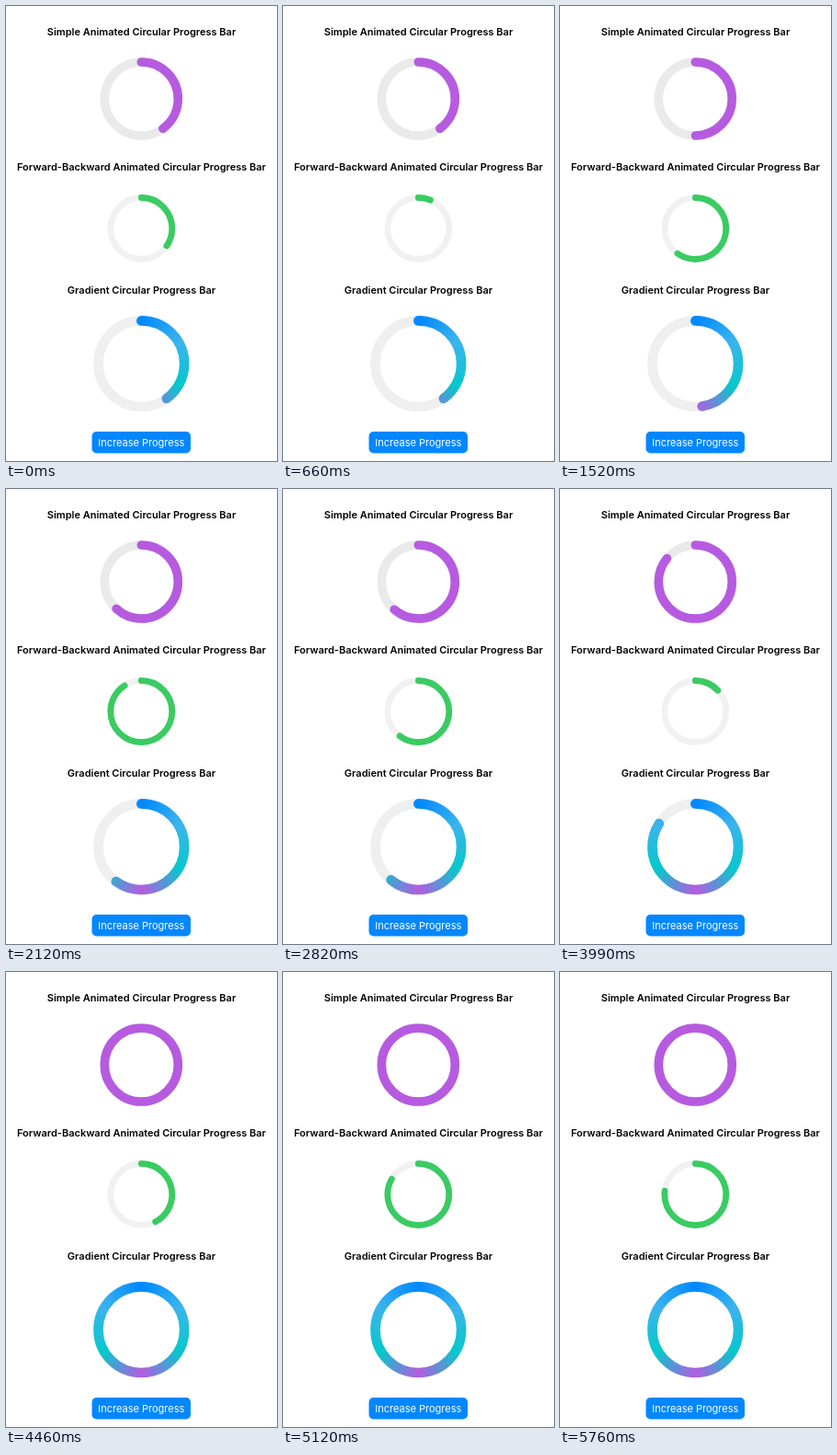
An HTML page with a canvas that plays this animation: 295x495 px, repeating every 5860 ms.

```html
<!DOCTYPE html>
<html lang="en">
<head>
<meta charset="utf-8">
<title>Circular progress bars</title>
<style>
  html, body { margin: 0; width: 100%; height: 100%; overflow: hidden; background: #fff; }
  canvas, svg { position: absolute; left: 0; top: 0; width: 295px; height: 495px; }
  text { font: 600 11px Inter, "Liberation Sans", sans-serif; text-anchor: middle; }
  .label { font-weight: 400; fill: #fff; }
</style>
</head>
<body>
<canvas></canvas>
<svg viewBox="0 0 295 495">
  <text x="147.5" y="31.5">Simple Animated Circular Progress Bar</text>
  <text x="147.5" y="179">Forward-Backward Animated Circular Progress Bar</text>
  <text x="147.5" y="313">Gradient Circular Progress Bar</text>
  <rect x="93.5" y="463" width="107.5" height="23.5" rx="5" fill="#0387ff"/>
  <text class="label" x="147.3" y="479">Increase Progress</text>
</svg>
<script>
const LOOP = 5860, SWEEP = 1610, LOW = 557, START = 0.4, STEP = 0.2;
const TAPS = [1250, 2720, 3800];
// Runs of evenly spaced picture changes: first, last, count
const RUNS = [
  [120, 660, 6], [760, 1320, 6], [1420, 1920, 6], [2020, 2450, 5], [2590, 3130, 6],
  [3230, 3760, 6], [3870, 4340, 5], [4460, 5020, 6], [5120, 5320, 3], [5460, 5760, 4]
];
const TICKS = [0, ...RUNS.flatMap(([a, b, n]) =>
  Array.from({ length: n }, (_, i) => a + (b - a) * i / (n - 1)))];

const canvas = document.querySelector('canvas');
const ctx = canvas.getContext('2d');
const ratio = window.devicePixelRatio || 1;
canvas.width = 295 * ratio;
canvas.height = 495 * ratio;
ctx.scale(ratio, ratio);
ctx.lineCap = 'round';

const rainbow = ctx.createConicGradient(-Math.PI / 2, 147.3, 389.2);
['#0088ff', '#3bb4ec', '#06c8cc', '#b45ce0', '#06c8cc', '#3bb4ec', '#0088ff']
  .forEach((color, i) => rainbow.addColorStop(i / 6, color));

function spring(ms) {
  const wt = 5 * ms / 1000, damping = 0.6, swing = 0.8 * wt;
  return 1 - Math.exp(-damping * wt) * (Math.cos(swing) + damping / 0.8 * Math.sin(swing));
}

function ease(ms) {
  const x = Math.min(ms / 650, 1);
  return x * x * (3 - 2 * x);
}

const progress = (t, curve) => Math.min(1,
  TAPS.reduce((sum, tap) => t > tap ? sum + STEP * curve(t - tap) : sum, START));

function pingPong(t) {
  const phase = Math.abs(t - LOW) / SWEEP % 2;
  return phase > 1 ? 2 - phase : phase;
}

function arc(y, radius, width, color, part) {
  ctx.beginPath();
  ctx.arc(147.3, y, radius, -Math.PI / 2, (2 * part - 0.5) * Math.PI);
  ctx.lineWidth = width;
  ctx.strokeStyle = color;
  ctx.stroke();
}

function ring(y, radius, width, track, color, part) {
  arc(y, radius, width, track, 1);
  arc(y, radius, width, color, part);
}

function draw(now) {
  const clock = now % LOOP;
  const t = TICKS.findLast(tick => tick <= clock);
  ctx.clearRect(0, 0, 295, 495);
  ring(101, 40, 9.6, '#eaeaea', '#b65be0', progress(t, spring));
  ring(242, 33.5, 6.8, '#f1f1f1', '#3acb62', pingPong(t));
  ring(389.2, 46.8, 10.6, '#efefef', rainbow, progress(t, ease));
}

const origin = performance.now();
function loop() {
  draw(performance.now() - origin);
  requestAnimationFrame(loop);
}
loop();
</script>
</body>
</html>
```
